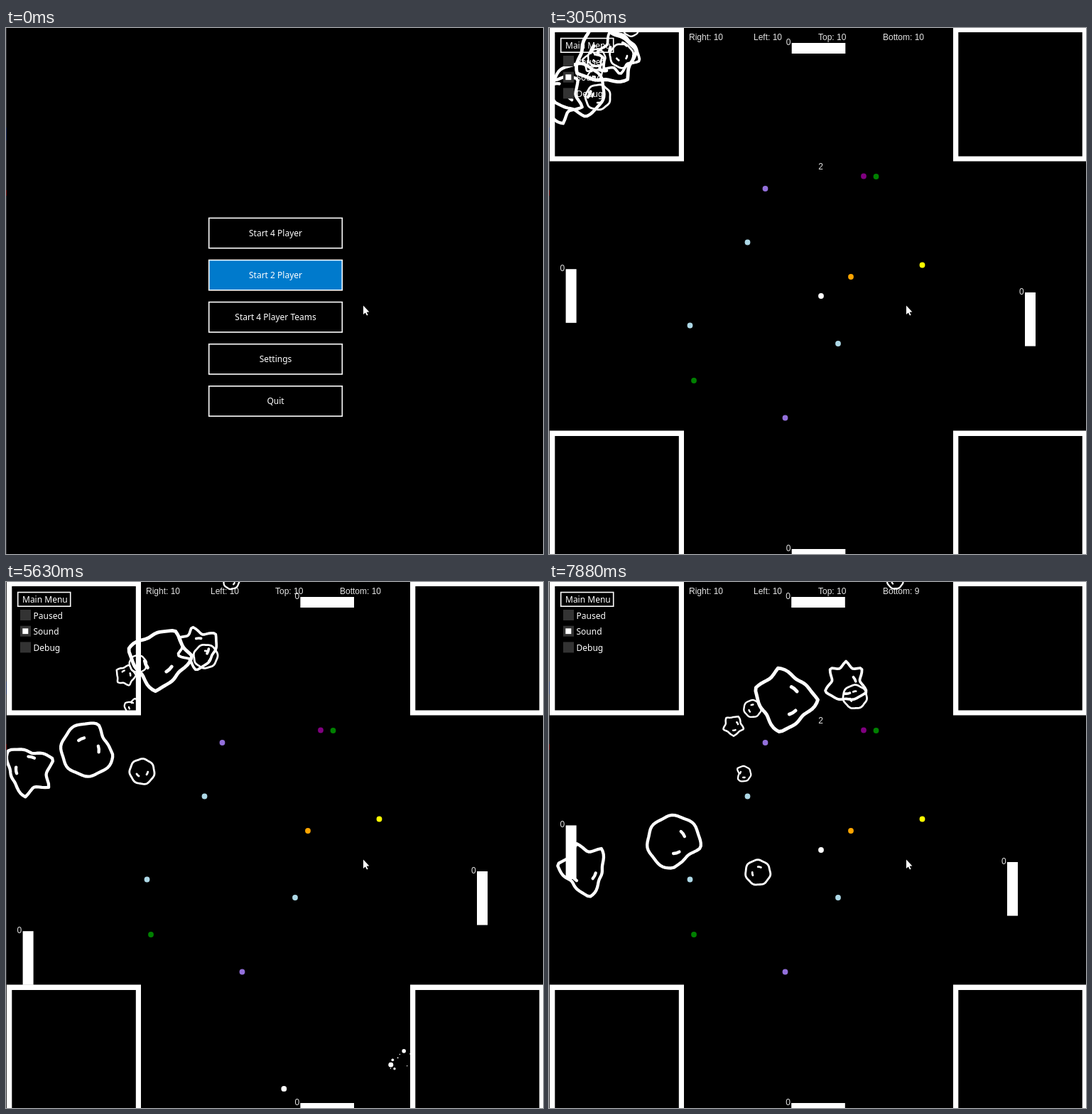
These frames come from a looping animation (756x740 px, 8000 ms). An HTML page with a canvas:

```html
<!DOCTYPE html>
<html lang="en">
<head>
<meta charset="utf-8">
<title>Four-way paddle game</title>
<style>
html, body { margin: 0; width: 100%; height: 100%; overflow: hidden; background: #000; }
canvas { display: block; }
</style>
</head>
<body>
<canvas id="stage" width="756" height="740"></canvas>
<script>
const ctx = document.getElementById('stage').getContext('2d');
const LOOP = 8000, PLAY = 1670, TICK = 132;
const LAUNCH = 4300, HIT = 5180, RESET = 6160, SPAWN = 1480;
const LONG = 75.6, THIN = 15;
const UI = '12px "Noto Sans", "Open Sans", sans-serif';
const HUD = '12px "Liberation Sans", Arial, sans-serif';
const HOME = { x: 383, y: 377 }, WALL = { x: 565, y: 685 };

// The player's paddle: [time, x, y]
const PLAYER = [[1670, 736, 339], [2990, 670, 372], [3300, 657, 372], [3860, 659, 326],
  [4290, 662, 325], [4580, 661, 357], [5090, 702, 385], [5630, 663, 407],
  [6200, 622, 410], [6950, 638, 380], [7220, 678, 378], [7490, 645, 394]];

const DOTS = {
  mediumpurple: [[304.5, 226], [332.5, 548.5]],
  lightblue: [[279.5, 301.5], [198.5, 418.5], [407, 444]],
  green: [[460.5, 209], [204, 496]],
  purple: [[443, 208.5]], yellow: [[525.5, 333.5]], orange: [[425, 350]]
};

// Drift in px/s, spin in deg/ms, corner directions and how deep the sides dip between them
const rock = (vx, vy, size, spin, dip, ...corners) => ({ vx, vy, size, spin, dip, corners });
const ROCKS = [
  rock(52, 26, 46, .117, .3, 0, 100, 202, 258),
  rock(65.4, 22.4, 31, .028, .45, 22, 160, 225, 270, 315),
  rock(67.5, 25.3, 18, .1, .5, 200),
  rock(27.3, 57, 39, .356, .3, 16, 92),
  rock(7.6, 63.4, 39, .416, .5, 80, 195, 257, 312),
  rock(46.1, 64, 19, .386, .5, 223),
  rock(40.6, 31.6, 15, .2, .3, 20, 90, 160, 230, 300),
  rock(44.9, 27.9, 13, .15, .5, 200),
  rock(42.9, 42.2, 11.5, .29, .45, 140, 220),
  rock(76.3, -.2, 12, .1, .5, 200)
];

const rad = deg => deg * Math.PI / 180;
const clamp = (v, lo, hi) => Math.max(lo, Math.min(hi, v));

function seeded(seed) {
  return () => (seed = seed * 16807 % 2147483647) / 2147483647;
}

function along(track, t) {
  const i = track.findIndex(k => k[0] > t);
  if (i < 0) return track[track.length - 1].slice(1);
  const a = track[i - 1], b = track[i], p = (t - a[0]) / (b[0] - a[0]);
  return [1, 2].map(j => a[j] + (b[j] - a[j]) * p);
}

function ball(t) {
  if (t < LAUNCH || t >= RESET) return HOME;
  if (t > HIT) return { x: WALL.x - .386 * (t - HIT), y: WALL.y + .062 * (t - HIT) };
  const p = (t - LAUNCH) / (HIT - LAUNCH);
  return { x: HOME.x + (WALL.x - HOME.x) * p, y: HOME.y + (WALL.y - HOME.y) * p };
}

// A computer paddle chases the ball along one axis, slightly late and at a fixed speed.
function chase(axis, centre, t) {
  const speed = .24, delay = 25, slack = 4, dt = 5;
  for (let s = LAUNCH; s < t; s += dt) {
    const gap = ball(s - delay)[axis] - centre;
    if (Math.abs(gap) > slack) centre += Math.sign(gap) * speed * dt;
    centre = clamp(centre, 228, 529);
  }
  return centre - LONG / 2;
}

function rect(color, x, y, w, h) {
  ctx.fillStyle = color;
  ctx.fillRect(x, y, w, h);
}

function disc(color, x, y, r) {
  ctx.fillStyle = color;
  ctx.beginPath();
  ctx.arc(x, y, r, 0, 7);
  ctx.fill();
}

function text(s, x, y, font, align = 'left') {
  ctx.fillStyle = font === HUD ? '#e4e4e4' : '#fff';
  ctx.font = font;
  ctx.textAlign = align;
  ctx.fillText(s, x, y);
}

function frame(x, y, w, h) {
  ctx.strokeStyle = '#fff';
  ctx.lineWidth = 1.6;
  ctx.strokeRect(x, y, w, h);
}

function drawEdge() {
  rect('#303034', 0, 0, 1, 740);
  rect('#1c2c58', 0, 140, 1, 18);
  rect('#7a1c1c', 0, 228, 1, 8);
}

function drawMenu(t) {
  const active = t < 430 ? 1 : t < 1020 ? 2 : t < 1300 ? 1 : 0;
  ['Start 4 Player', 'Start 2 Player', 'Start 4 Player Teams', 'Settings', 'Quit'].forEach((s, i) => {
    const y = 267.4 + i * 59.1;
    if (i === active) rect('#007acc', 285.7, y, 187.6, 42.3);
    frame(285.7, y, 187.6, 42.3);
    text(s, 379.5, y + 25.6, UI, 'center');
  });
}

function drawWalls() {
  for (const x of [1, 569]) {
    for (const y of [-1.5, 566.5]) {
      rect('#fff', x, y, 189, 189);
      rect('#000', x + 7.3, y + 7.5, 174.5, 174.5);
    }
  }
}

function drawPaddle(x, y, w, h) {
  rect('#fff', x, y, w, h);
  text('0', x - 8, y + 3, HUD);
}

function radiusAt({ size, dip, corners }, deg) {
  const n = corners.length;
  let i = corners.findIndex(c => c > deg);
  if (i < 0) i = n;
  const from = i ? corners[i - 1] : corners[n - 1] - 360;
  const to = i < n ? corners[i] : corners[0] + 360;
  const gap = to - from, depth = dip * Math.min(gap / 90, 90 / gap);
  const side = Math.sin(Math.PI * (deg - from) / gap);
  return size * (1 - depth * side + .025 * Math.sin(rad(deg * 7)));
}

function drawRock(r, t) {
  const age = (t - SPAWN) / 1000, first = r.corners[0];
  ctx.save();
  ctx.translate(r.vx * age, r.vy * age);
  ctx.rotate(rad(r.spin * (t - 7880)));
  ctx.strokeStyle = '#fff';
  ctx.lineWidth = 1.4 + r.size * .075;
  ctx.lineCap = ctx.lineJoin = 'round';
  ctx.beginPath();
  for (let deg = 0; deg < 360; deg += 6) {
    const d = radiusAt(r, deg);
    ctx.lineTo(d * Math.cos(rad(deg)), d * Math.sin(rad(deg)));
  }
  ctx.closePath();
  for (const deg of [first - 50, first + 60]) {
    const a = rad(deg), d = r.size * .45;
    ctx.moveTo(d * Math.cos(a - .25), d * Math.sin(a - .25));
    ctx.arc(0, 0, d, a - .25, a + .25);
  }
  ctx.stroke();
  ctx.restore();
}

function drawPanel() {
  frame(16.7, 14.5, 74, 19.7);
  text('Main Menu', 23, 28.8, UI);
  ['Paused', 'Sound', 'Debug'].forEach((s, i) => {
    const y = 39 + i * 22.7;
    rect('#333', 20, y, THIN, THIN);
    if (s === 'Sound') rect('#fff', 23.3, y + 3.6, 8, 7.8);
    text(s, 38.5, y + 12.5, UI);
  });
}

function drawCount(t) {
  if (t >= LAUNCH && t < RESET) return;
  const from = t < LAUNCH ? LAUNCH - 3000 : RESET;
  text(Math.round((t - from) / 1000), 379.3, 199, HUD);
}

function drawDebris(t) {
  const p = (t - HIT) / 450, rnd = seeded(77);
  if (p < 0 || p >= 2) return;
  for (let i = 0; i < 9; i++) {
    const dx = -28 * rnd(), dy = 38 * rnd() - 26, r = .7 + 2.8 * rnd() ** 2;
    disc('#fff', 569 + dx * p, WALL.y + dy * p, r * (2 - p));
  }
}

function drawGame(t) {
  drawWalls();
  const lives = t < RESET ? 10 : 9;
  ['Right: 10', 'Left: 10', 'Top: 10', 'Bottom: ' + lives]
    .forEach((s, i) => text(s, 197 + i * 91, 17, HUD));
  drawCount(t);
  for (const color in DOTS) {
    for (const [x, y] of DOTS[color]) disc(color, x, y, 3.9);
  }
  for (const r of ROCKS) drawRock(r, t);
  const x = chase('x', 379.5, t);
  drawPaddle(x, 21, LONG, THIN);
  drawPaddle(x, 733, LONG, THIN);
  drawPaddle(23.6, chase('y', 377, t), THIN, LONG);
  drawPaddle(...along(PLAYER, t), THIN, LONG);
  drawDebris(t);
  const b = ball(t);
  disc('#fff', b.x, b.y, 3.9);
  if (t > PLAY) drawPanel();
}

function drawCursor() {
  ctx.fillStyle = '#fff';
  ctx.fill(new Path2D('M503 390.5V403l2.8-2.6 2.2 4.1 1.6-.8-2-3.9 3.8-.4z'));
}

function draw(t) {
  rect('#000', 0, 0, 756, 740);
  if (t < PLAY) drawMenu(t);
  else drawGame(PLAY + TICK * Math.floor((t - PLAY) / TICK));
  drawEdge();
  drawCursor();
}

const start = performance.now();
function tick() {
  draw((performance.now() - start) % LOOP);
  requestAnimationFrame(tick);
}
tick();
</script>
</body>
</html>
```
